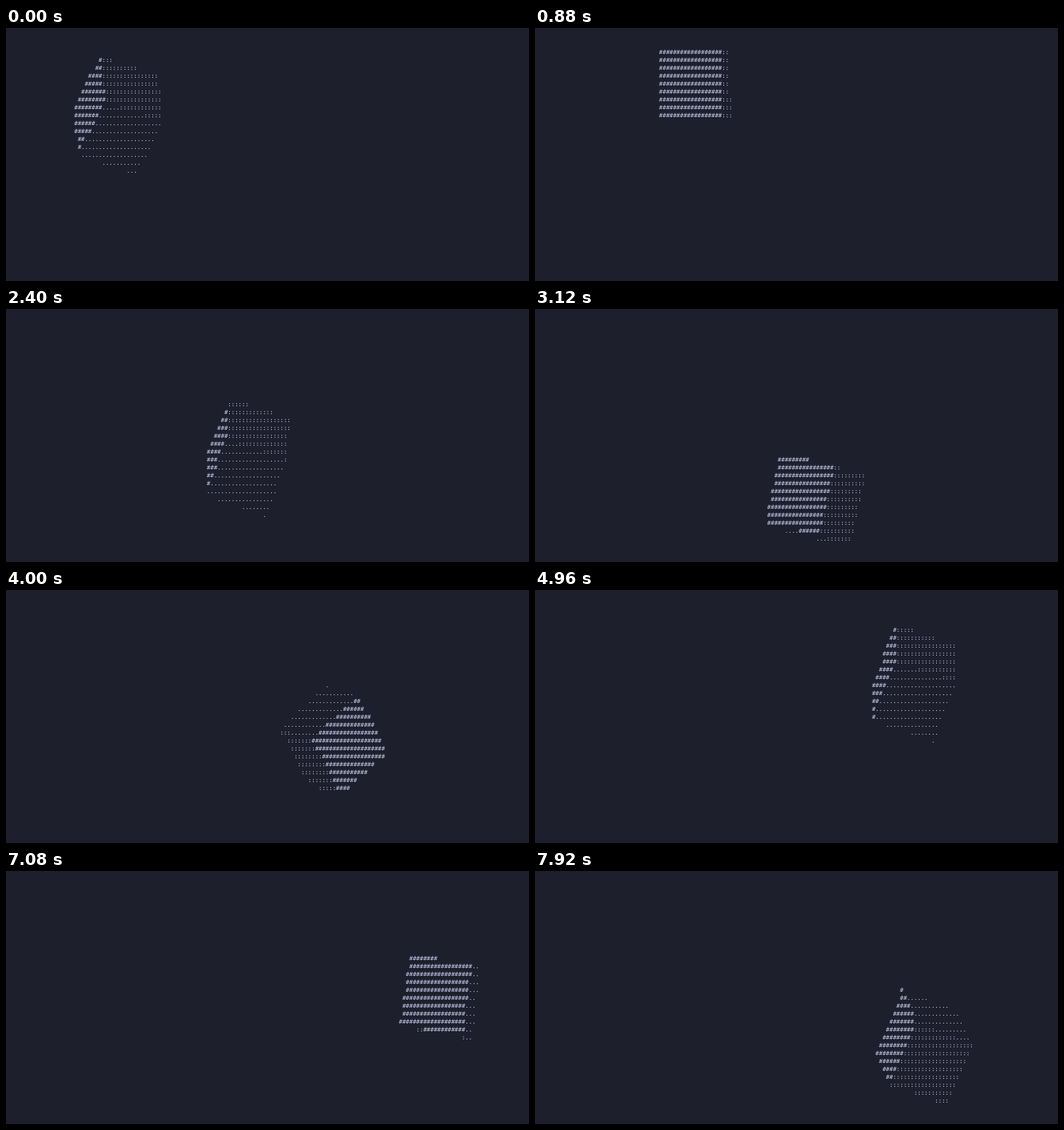
Animation of 661x320 px, one loop 8000 ms. Source, as an HTML page:

```html
<!DOCTYPE html>
<html lang="en">
<head>
<meta charset="utf-8">
<title>Bouncing cube</title>
<style>
  html, body { margin: 0; width: 100%; height: 100%; overflow: hidden; background: #1e1f2d; }
  svg { display: block; width: 661px; height: 320px; }
  text {
    font: 7.333px "DejaVu Sans Mono", monospace;
    fill: #cdd6f4;
    white-space: pre;
    text-rendering: geometricPrecision;
    font-variant-ligatures: none;
  }
</style>
</head>
<body>
<svg id="stage" viewBox="0 0 661 320"></svg>
<script>
const LOOP = 8000, TICK = 40;
const COLS = 149, ROWS = 31, ROW_H = 10, LEFT = 2.4;
const SIDE_X = 18.4, SIDE_Y = 9.2;      // cube side in columns and rows
const WALL = 6.53;                      // seconds until the right wall
const TOP = 0.695, FALL = 2.525;        // first ceiling hit, ceiling to floor
const TILT = 0.3, RAD = Math.PI / 180;

const stage = document.getElementById("stage");
const lines = Array.from({ length: ROWS }, (_, i) => {
  const line = document.createElementNS("http://www.w3.org/2000/svg", "text");
  line.setAttribute("x", LEFT);
  line.setAttribute("y", (i + 1) * ROW_H + 2.8);
  return stage.appendChild(line);
});

const mix = (a, u, b, v) => a.map((n, i) => n * u + b[i] * v);
const dot = (a, b) => a[0] * b[0] + a[1] * b[1] + a[2] * b[2];
const mod = (a, n) => ((a % n) + n) % n;

// Spin follows the travel, so it reverses with every bounce.
function pose(t) {
  const across = WALL - Math.abs(t - WALL);
  const down = Math.abs(mod(t - TOP + FALL, 2 * FALL) - FALL);
  return {
    x: 31.55 + 15.45 * across,
    y: 5.65 + 7.6 * down,
    yaw: (-70 + 70.5 * across) * RAD,
    roll: (-5 - 70 * down) * RAD
  };
}

function cubeFaces(yaw, roll) {
  const c = Math.cos(TILT), s = Math.sin(TILT);
  const side = [Math.cos(yaw) * c, Math.cos(yaw) * s, -Math.sin(yaw)];
  const below = [-s, c, 0];
  const front = [Math.sin(yaw) * c, Math.sin(yaw) * s, Math.cos(yaw)];
  const axes = [
    front,
    mix(side, Math.cos(roll), below, Math.sin(roll)),
    mix(side, -Math.sin(roll), below, Math.cos(roll))
  ];
  return axes.map((axis, i) => ({
    char: "#:."[i],
    normal: axis[2] < 0 ? axis.map(n => -n) : axis,
    others: axes.filter(a => a !== axis)
  })).filter(f => f.normal[2] > 1e-4);
}

function charAt(faces, x, y) {
  for (const { char, normal, others } of faces) {
    const z = (0.5 - normal[0] * x - normal[1] * y) / normal[2];
    if (others.every(a => Math.abs(dot(a, [x, y, z])) <= 0.5)) return char;
  }
  return " ";
}

function render(ms) {
  const { x, y, yaw, roll } = pose(ms / 1000);
  const faces = cubeFaces(yaw, roll);
  lines.forEach((line, i) => {
    const dy = (i + 1 - y) / SIDE_Y;
    let row = "";
    if (Math.abs(dy) < 1) {
      for (let col = 0; col < COLS; col++) {
        const dx = (col + 0.5 - x) / SIDE_X;
        row += Math.abs(dx) < 1 ? charAt(faces, dx, dy) : " ";
      }
    }
    row = row.trimEnd();
    if (line.textContent !== row) line.textContent = row;
  });
}

const start = performance.now();
function loop() {
  const ms = (performance.now() - start) % LOOP;
  render(Math.floor(ms / TICK) * TICK);
  requestAnimationFrame(loop);
}
loop();
</script>
</body>
</html>
```
